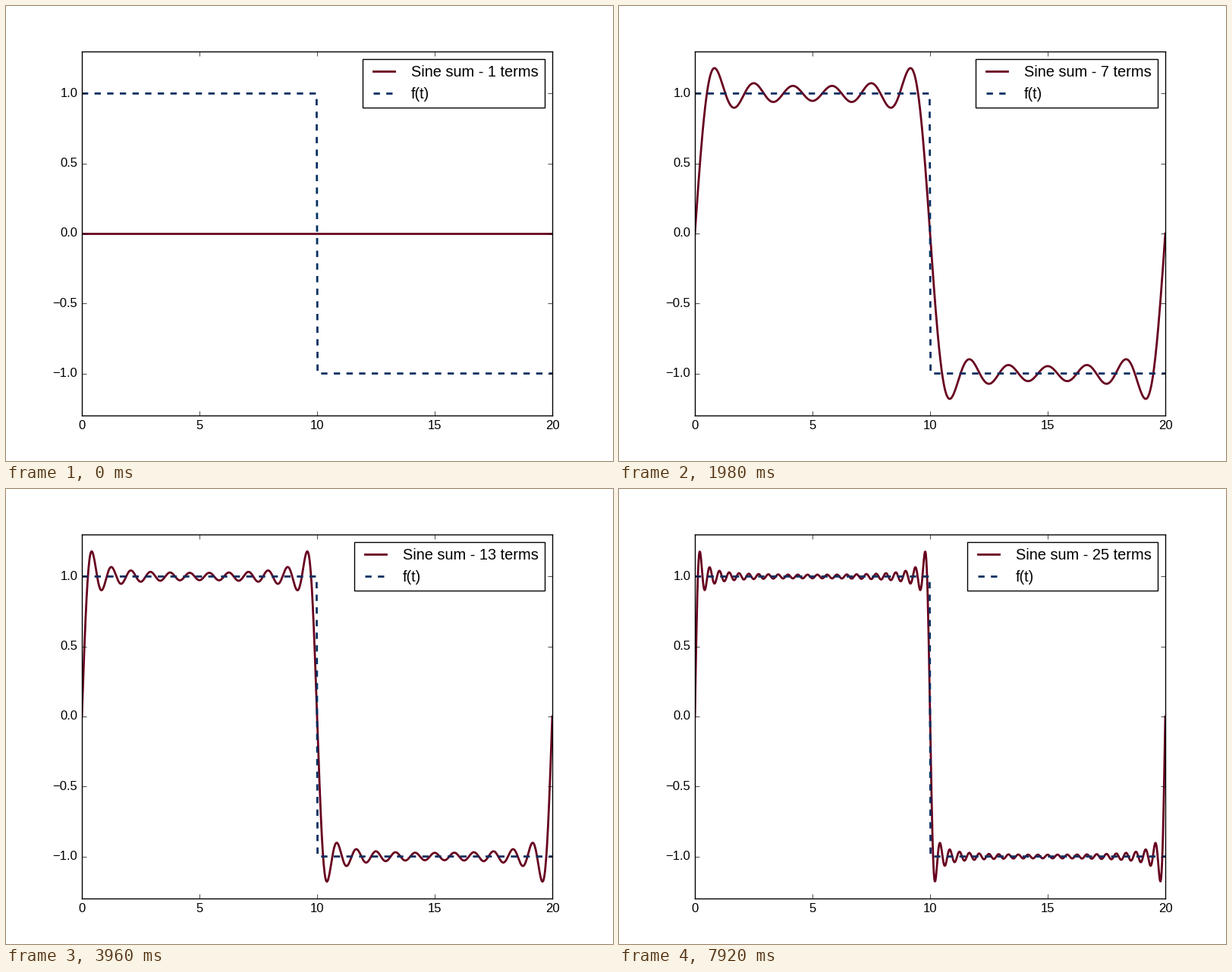
Animation of 800x600 px, one loop 8000 ms. Source, as a matplotlib script:

```python
import numpy as np
import matplotlib.pyplot as plt
from matplotlib.animation import FuncAnimation

STEP = 330       # ms each partial sum stays
INTERVAL = 40    # ms per drawn frame
LOOP = 8000      # ms
PERIOD = 20.0

RED = "#67001f"
BLUE = "#053061"

plt.style.use("classic")
plt.rcParams["font.family"] = "Liberation Sans"

t = np.linspace(0, PERIOD, 1001)
square = np.sign(PERIOD / 2 - t)
square[0], square[-1] = 1, -1


def sine_sum(terms):
    """Partial Fourier sum of the square wave; one term is the zero line."""
    y = np.zeros_like(t)
    for n in range(1, terms):
        k = 2 * n - 1
        y += 4 / (np.pi * k) * np.sin(2 * np.pi * k * t / PERIOD)
    return y


def label(terms):
    return f"Sine sum - {terms} terms"


fig, ax = plt.subplots(figsize=(8, 6), dpi=100, facecolor="white")
curve, = ax.plot(t, sine_sum(1), color=RED, lw=2, label=label(1))
ax.plot(t, square, "--", color=BLUE, lw=2, label="f(t)")
ax.set_xlim(0, PERIOD)
ax.set_ylim(-1.3, 1.3)
ax.set_xticks(np.arange(0, 21, 5))
ax.set_yticks(np.arange(-1, 1.1, 0.5))
legend = ax.legend(loc="upper right", numpoints=2)
caption = legend.get_texts()[0]


def update(i):
    # switch on the frame nearest to each step
    terms = 1 + (i * INTERVAL + INTERVAL // 2) // STEP
    curve.set_ydata(sine_sum(terms))
    caption.set_text(label(terms))
    return curve, caption


anim = FuncAnimation(fig, update, frames=LOOP // INTERVAL, interval=INTERVAL,
                     init_func=lambda: update(0), repeat=True, repeat_delay=0)
plt.show()
```
